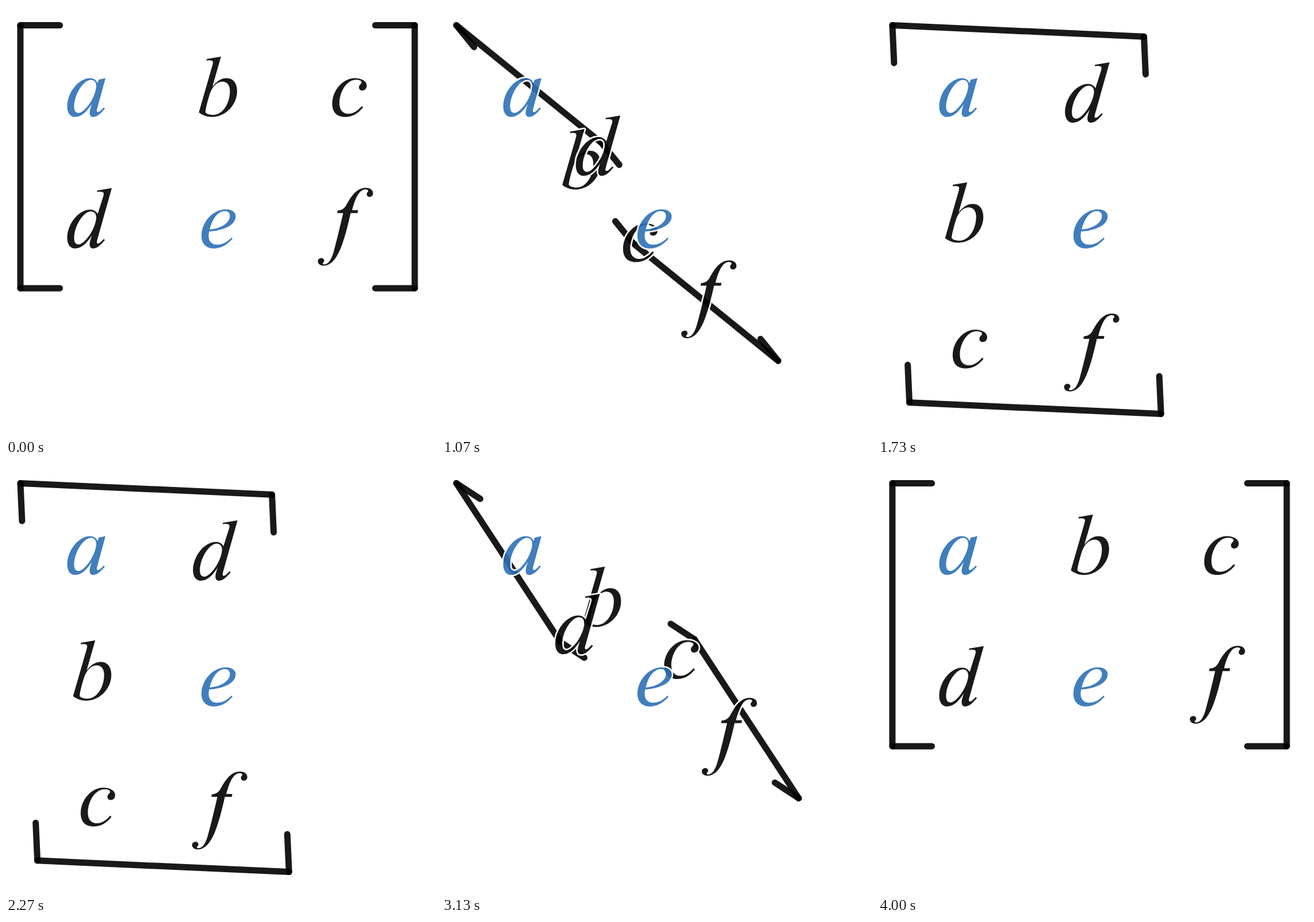
Recreate the animation shown at these times as an HTML page. Size 748 by 748 pixels, loop 4030 ms.

```html
<!DOCTYPE html>
<html lang="en">
<head>
<meta charset="utf-8">
<title>Matrix transpose</title>
<style>
  html, body { margin: 0; width: 100%; height: 100%; overflow: hidden; background: #fff; }
  svg { display: block; width: 748px; height: 748px; }
  line { stroke: #000; stroke-opacity: .9; stroke-width: 11; stroke-linecap: round; }
  path { fill-rule: evenodd; }
  .ink { fill: #000; fill-opacity: .9; }
  .ink.diagonal { fill: #2c71b6; }
  .halo { fill: none; stroke: #fff; stroke-width: 5.5; stroke-linejoin: round; }
  .label { font: italic 152px "Liberation Serif", serif; fill: transparent; }
</style>
</head>
<body>
<svg id="stage" viewBox="0 0 748 748"></svg>
<script>
const LOOP = 4030, STEPS = 120;
const LEFT = 25, TOP = 33.5, WIDTH = 686, HEIGHT = 457.4;
const TICK = WIDTH / 10, PITCH = WIDTH / 3;
const stage = document.getElementById('stage');

function add(parent, tag, attrs, text) {
  const node = document.createElementNS('http://www.w3.org/2000/svg', tag);
  for (const key in attrs) node.setAttribute(key, attrs[key]);
  if (text) node.textContent = text;
  return parent.appendChild(node);
}

// Bracket strokes, measured from the top left corner
const strokes = [];
for (const [x, dir] of [[0, 1], [WIDTH, -1]]) {
  strokes.push([x, 0, x, HEIGHT]);
  for (const y of [0, HEIGHT]) strokes.push([x, y, x + dir * TICK, y]);
}
const lines = strokes.map(ends => ({ ends, node: add(stage, 'line', {}) }));

// Letterforms that no installed font has, all drawn on the first row's baseline
const bowl = `C157.5 129 152.5 125.5 146.5 125.5 C126.5 125.5 106.5 150 106.5 175
  C106.5 186 112 193 120 193 C131 193 140 184.5 149.5 170 C147 176.5 145.5 182 145.5 186
  C145.5 190.5 148 193 151.5 193 C158 193 164 188 172 178.5 L170 176.5
  C165 182 162 184.5 160 184.5 C158.5 184.5 158 183.5 158 182 C158 181 158.2 180 158.6 178.5 Z
  M148 128.5 C153 128.5 157 132.5 157 139 C157 146 153 158 146.5 168
  C140 178 132 186 126 186 C121 186 118.5 182 118.5 175 C118.5 155 134 128.5 148 128.5 Z`;
const glyphs = {
  a: 'M173 125.5 L161.5 128 L159 134' + bowl,
  b: `M374 88 L349 92.3 V94.8 C351 94.5 352 94.4 353.5 94.4 C358 94.4 360 95.5 360 98
    C360 99.5 359.6 101.5 359 103.5 L335.5 185 C341 189.5 349.5 193 358 193
    C382 193 402 172 402 148 C402 134 395 125.5 384 125.5 C375 125.5 367 130 359 140.5 Z
    M376 131.5 C385 131.5 389.5 138 389.5 148 C389.5 168 378 189.5 360 189.5
    C354 189.5 347 187 347 184.5 C347 180 351 163 355 151.5 C358.5 141 367 131.5 376 131.5 Z`,
  c: `M621 176.5 C612 187.5 602 193 590 193 C575 193 567.5 184 567.5 170
    C567.5 147 586 125.5 606.5 125.5 C619 125.5 627.5 131 627.5 138.5
    C627.5 143.5 624 147 619.5 147 C616 147 614 144.5 614 141.5
    C614 136.5 618.5 136 618.5 132.5 C618.5 130 614.5 128.3 609 128.3
    C593 128.3 580 149 580 169 C580 181 586 187.5 595.5 187.5 C604 187.5 611 183 619 174 Z`,
  d: `M184 88 L158.5 92.3 V94.8 C160 94.5 161.5 94.4 163 94.4 C168 94.4 170 95.5 170 98
    C170 99.5 169.5 101.5 169 103 L159.5 133` + bowl,
  e: `M394 176 C385 186.5 374 193 361.5 193 C348 193 340 184.5 340 171
    C340 147.5 360 125 382 125 C392.5 125 399.5 129.5 399.5 137
    C399.5 151.5 381 161.5 353.5 163.5 C352.8 166.5 352.5 168.5 352.5 171
    C352.5 180.5 358 186.5 367 186.5 C376 186.5 384 182.5 392.5 174 Z
    M354.5 160 C374 158.5 389.5 148.5 389.5 136.5 C389.5 131 386 128 380.5 128
    C369 128 358.5 141.5 354.5 160 Z`,
  f: `M612.5 126.5 L611.5 131.5 H599.5 C595 152.5 588 179.5 581 195.5
    C573.5 212.5 564 223 553 223 C546.5 223 542.5 219.5 542.5 215.5
    C542.5 212 545 209.8 548.5 209.8 C551.5 209.8 553.5 211.8 553.5 214.3
    C553.5 217 551 217.5 551 219.3 C551 220.3 552 220.8 553.5 220.8
    C560.5 220.8 566 212.5 570 198.5 C574 184.5 581 155.5 586.5 131.5 H576 L577 127
    C583.5 126.5 587.5 124.5 591.5 118.5 C602 98.5 612 87.5 626 87.5
    C633.5 87.5 638.5 91.5 638.5 97 C638.5 100.8 636 103.3 632.5 103.3
    C629.5 103.3 627.5 101.3 627.5 98.5 C627.5 95.5 630 94.8 630 92.8
    C630 91.3 628 90.3 625.5 90.3 C616 90.3 608.5 101.5 602 126.5 Z`
};

const letters = Object.entries(glyphs).map(([name, d], i) => {
  const row = Math.floor(i / 3), col = i % 3;
  const node = add(stage, 'g', {});
  const id = 'outside-' + name;
  // The halo lies only outside the glyph, so strokes show through its ink
  const mask = add(node, 'mask', { id, maskUnits: 'userSpaceOnUse', x: 0, y: 0, width: 748, height: 748 });
  add(mask, 'rect', { width: 748, height: 748, fill: '#fff' });
  add(mask, 'path', { d });
  add(node, 'path', { d, class: 'halo', mask: `url(#${id})` });
  add(node, 'path', { d, class: row === col ? 'ink diagonal' : 'ink' });
  // Selectable, readable text over the drawn letter
  add(node, 'text', { x: 139.5 + col * PITCH, y: 191.5, 'text-anchor': 'middle', class: 'label' }, name);
  return { node, row, offset: (row - col) * PITCH };
});

const mix = (a, b, p) => a + (b - a) * p;

// p = 0 is the matrix, p = 1 its transpose
function draw(p) {
  for (const { ends: [x1, y1, x2, y2], node } of lines) {
    node.setAttribute('x1', LEFT + mix(x1, y1, p));
    node.setAttribute('y1', TOP + mix(y1, x1, p));
    node.setAttribute('x2', LEFT + mix(x2, y2, p));
    node.setAttribute('y2', TOP + mix(y2, x2, p));
  }
  for (const { node, row, offset } of letters) {
    node.setAttribute('transform', `translate(${offset * p} ${row * PITCH - offset * p})`);
  }
}

const start = performance.now();
function tick() {
  const time = (performance.now() - start) % LOOP;
  // Thirty steps a second, timed in hundredths
  const step = Math.floor((3 * Math.floor(time / 10) + 1) / 10);
  draw((1 - Math.cos(2 * Math.PI * step / STEPS)) / 2);
  requestAnimationFrame(tick);
}
tick();
</script>
</body>
</html>
```
